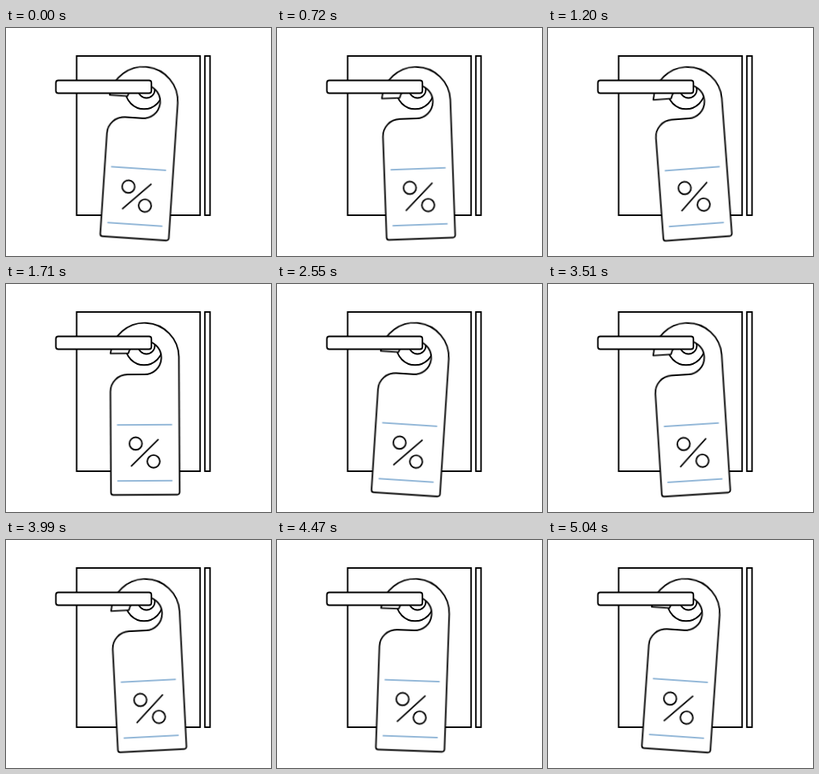
An HTML page for the animation above (5.07 s loop, 332 by 285 pixels).

```html
<!DOCTYPE html>
<html lang="en">
<head>
<meta charset="utf-8">
<title>Door hanger</title>
<style>
  html, body { margin: 0; width: 100%; height: 100%; overflow: hidden; background: #fff; }
  svg { display: block; width: 332px; height: 285px; }
  .ink { fill: #fff; stroke: #000; stroke-width: 1.9; stroke-linecap: round; stroke-linejoin: round; }
  .rule { stroke: #94b8d8; stroke-width: 1.8; }
  #tag { transform-box: view-box; transform-origin: 175px 72px; }
</style>
</head>
<body>
<svg viewBox="0 0 332 285">
  <g class="ink">
    <!-- door and frame -->
    <g stroke-linejoin="miter">
      <rect x="88.5" y="35" width="154.7" height="199"/>
      <rect x="249.2" y="35" width="6.4" height="199"/>
    </g>
    <!-- handle base -->
    <circle cx="173" cy="78" r="23.3"/>
    <circle cx="176" cy="77" r="10.5"/>
    <g id="tag">
      <path d="M130.8 86.6 A43 43 0 0 1 216.5 91 V260.5 a3 3 0 0 1 -3 3
               H133.5 a3 3 0 0 1 -3 -3 V134.5 A21.5 21.5 0 0 1 152 113
               H173.5 A21 21 0 1 0 153.2 86.6 Z"/>
      <path class="rule" stroke-linecap="butt" d="M138.5 176 h69 M138.5 246 h69"/>
      <circle cx="161.8" cy="199.4" r="7.9"/>
      <circle cx="184" cy="221.8" r="7.9"/>
      <path d="M156.3 227.4 L189.8 194.6"/>
    </g>
    <rect x="62.5" y="65.5" width="119.7" height="16" rx="3"/>
  </g>
</svg>
<script>
  const PERIOD = 2535;   // one full swing; two make a loop
  const LEAD = 155;      // time since the left extreme at load
  const easing = "cubic-bezier(.3, .1, .63, 1)";
  const swing = [[0, 4.4], [1390, -4.25], [PERIOD, 4.4]];

  document.getElementById("tag").animate(
    swing.map(([ms, deg]) => ({
      offset: ms / PERIOD,
      transform: `rotate(${deg}deg)`,
      easing
    })),
    { duration: PERIOD, delay: -LEAD, iterations: Infinity }
  );
</script>
</body>
</html>
```
